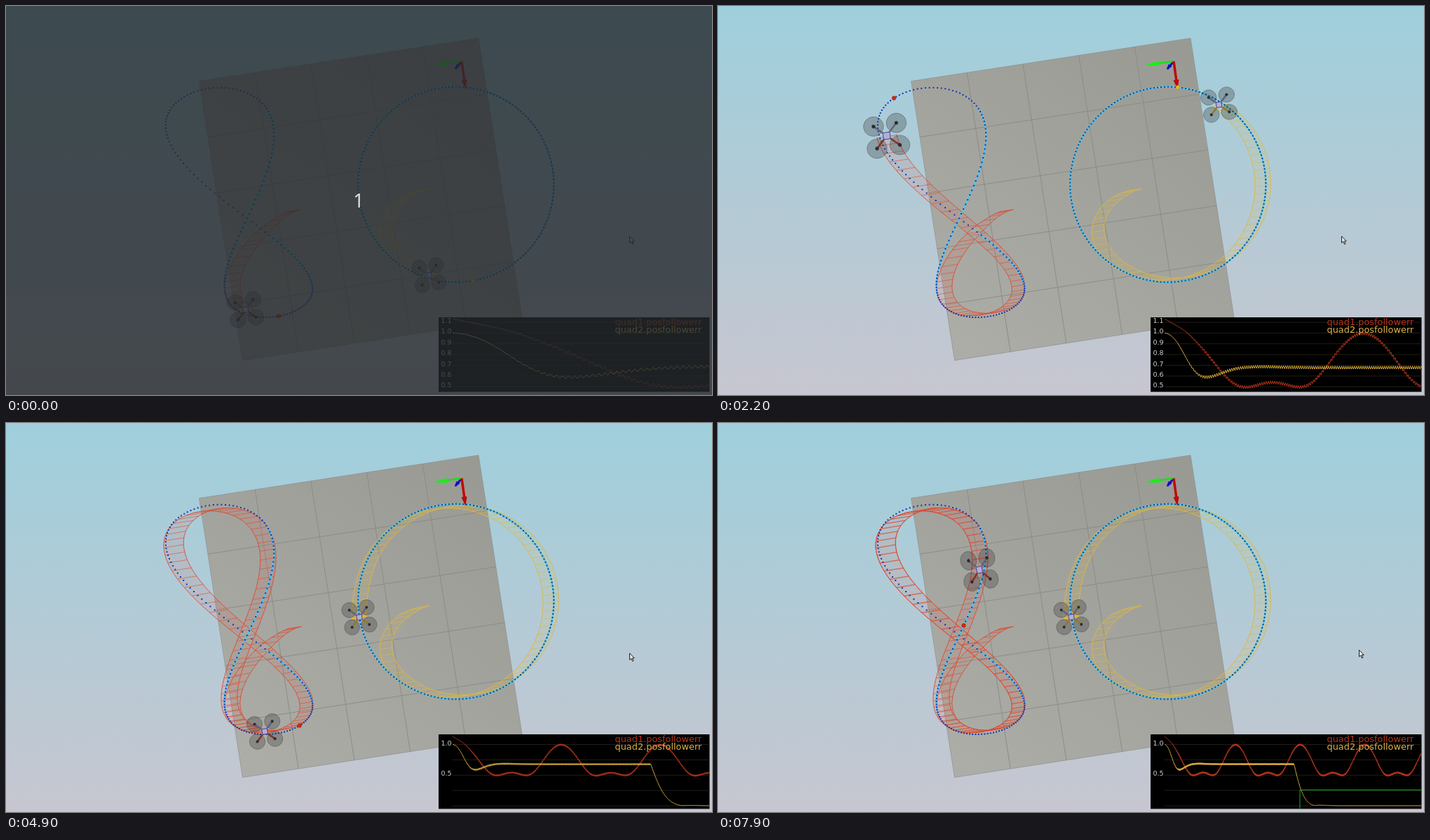
Write an HTML page that moves like this. It is 1007 px wide and 556 px high and loops after 8 s.

```html
<!DOCTYPE html>
<html lang="en">
<head>
<meta charset="utf-8">
<title>Two quadrotors following paths</title>
<style>
html,body{margin:0;width:100%;height:100%;overflow:hidden;background:#b4cbd3}
svg{display:block;width:100vw;height:100vh}
text{font-family:"DejaVu Sans",sans-serif}
.ribbon path{fill:none;stroke:currentColor}
.ribbon .area{fill:currentColor;fill-opacity:.1;stroke:none}
.drone *{vector-effect:non-scaling-stroke}
</style>
</head>
<body>
<svg viewBox="0 0 1007 556" preserveAspectRatio="none">
  <defs>
    <linearGradient id="sky" x2="0" y2="1">
      <stop stop-color="#9fcfdc"/><stop offset="1" stop-color="#c7c6d0"/>
    </linearGradient>
    <linearGradient id="floor" x1=".9" y1="0" x2=".2" y2="1">
      <stop stop-color="#999994"/><stop offset="1" stop-color="#adada7"/>
    </linearGradient>
    <clipPath id="clip"><rect x="617" y="445" width="386.500" height="106.600"/></clipPath>
  </defs>
  <rect width="1007" height="556" fill="url(#sky)"/>
  <path d="M275.500 107.500L674 46L736 445L337.500 506.500Z" fill="url(#floor)" stroke="#8c8f8d" stroke-width=".7"/>
  <path id="tiles" stroke="#8c8c87" fill="none"/>
  <g id="ribbons"></g>
  <g id="paths" fill="none"></g>
  <g fill="none">
    <path d="M650 79L641 90" stroke="#1010b8" stroke-width="3"/>
    <path d="M640 91l2.500-8 5 3.500z" fill="#1010b8"/>
    <path d="M650 79L620 83" stroke="#18e018" stroke-width="2.500"/>
    <path d="M609 84.500l19-6 1 7z" fill="#18f018"/>
    <path d="M650 79L654 108" stroke="#c00808" stroke-width="3.500"/>
    <path d="M655.500 119l-6-13 8-1z" fill="#c00808"/>
  </g>
  <g id="movers"></g>
  <path id="cursor" d="M0 0V9.500L2.300 7.500L4 11.500L5.500 10.800L3.900 7H6.800Z" fill="#e4e4e4" stroke="#222"/>
  <g clip-path="url(#clip)">
    <rect x="617" y="445" width="387" height="107"/>
    <path id="rules" stroke="#241d18"/>
    <path id="plot1" fill="none" stroke="#bb361c"/>
    <path id="plot2" fill="none" stroke="#dcb03c"/>
    <g id="ticks" font-size="9.500" fill="#d4d4d4"></g>
    <text x="868.500" y="455.500" font-size="12.900" fill="#b8341c">quad1.posfollowerr</text>
    <text x="868.500" y="467" font-size="12.900" fill="#dcb848">quad2.posfollowerr</text>
    <path id="frame" d="M1004 524.500H830V551" fill="none" stroke="#22a822"/>
  </g>
  <g id="count">
    <rect width="1007" height="556" fill="#252a2d" fill-opacity=".8"/>
    <text x="503" y="288" font-size="27" text-anchor="middle" fill="#dedede" style="font-family:'Noto Sans',sans-serif">1</text>
  </g>
</svg>
<script>
const $ = id => document.getElementById(id);
const clamp = (v, a = 0, b = 1) => Math.min(b, Math.max(a, v));
const line = pts => 'M' + pts.map(p => p[0].toFixed(1) + ' ' + p[1].toFixed(1)).join('L');
const { sin, cos, hypot, PI } = Math;

function make(tag, parent, attrs) {
  const el = document.createElementNS('http://www.w3.org/2000/svg', tag);
  for (const k in attrs) el.setAttribute(k, attrs[k]);
  return parent.appendChild(el);
}

// World: metres, x to the right, y towards the viewer's bottom, z up; camera looks down
const UNIT = 106, CAM = 7.2, ORIGIN = [504, 277.5], TILT = [.987, .16];
const zoom = z => 1 / (1 - z / CAM);
const axes = (x, y) => [x * TILT[0] + y * TILT[1], y * TILT[0] - x * TILT[1]];
function project([x, y, z]) {
  const s = UNIT * zoom(z), [a, b] = axes(x, y);
  return [ORIGIN[0] + a * s, ORIGIN[1] + b * s];
}

// Reference paths by angle; both start at angle 0
const RATE = 82 * PI / 180;
const eight = a => [-1.53 - .64 * sin(2 * a), 1.56 * sin(a), -sin(a)];
const ring = a => [1.5 - 1.5 * cos(a), 1.5 * sin(a), -1];
const goal1 = T => eight(RATE * T);
const goal2 = T => ring(Math.min(RATE * T, 2 * PI));

// A damped spring with limited thrust pulls each drone after its goal
const STEP = .0065, END = 8.9, STIFF = 5.1, DAMP = .82, THRUST = 9;
function fly(goal, x) {
  let pos = [x, 0, -1], vel = [0, 0, 0];
  const log = [];
  for (let i = 0; i * STEP < END; i++) {
    const T = i * STEP, aim = goal(T);
    let acc = pos.map((p, k) => STIFF * STIFF * (aim[k] - p) - 2 * DAMP * STIFF * vel[k]);
    const cut = Math.min(1, THRUST / hypot(...acc));
    acc = acc.map(a => a * cut);
    const moving = goal(T + STEP)[1] != aim[1];
    const ripple = [0, .014, 0, -.014][i % 4] * clamp((T - .2) / .3) * moving;
    log.push({ pos, acc, err: hypot(...pos.map((p, k) => aim[k] - p)) + ripple });
    vel = vel.map((v, k) => v + acc[k] * STEP);
    pos = pos.map((p, k) => p + vel[k] * STEP);
  }
  return log;
}
const log1 = fly(goal1, -1), log2 = fly(goal2, 1);

// Screen frame of a banked drone: right axis, down axis, centre
function pose({ pos, acc }) {
  const s = 14.2 * zoom(pos[2]);
  const [w, h] = [0, 1].map(k => {
    const bank = Math.atan(acc[k] / 9.8);
    return s * (cos(bank) - sin(bank) * pos[k] / (CAM - pos[2]));
  });
  return [...axes(w, 0), ...axes(0, h), ...project(pos)];
}

// Static parts
let tiles = '';
for (let i = 1; i < 5; i++) {
  const u = i / 5;
  tiles += `M${275.5 + 398.5 * u} ${107.5 - 61.5 * u}l62 399M${275.5 + 62 * u} ${107.5 + 399 * u}l398.5 -61.5`;
}
$('tiles').setAttribute('d', tiles);

function sample(path, from, to, step) {
  const out = [];
  for (let a = from; a < to; a += step) out.push(project(path(a)));
  return out;
}
const addPath = attrs => make('path', $('paths'), attrs);
const glow = (path, from, to) => addPath({
  d: line(sample(path, from * PI, to * PI, .03)), stroke: '#48c8ee', 'stroke-width': 2.2, 'stroke-opacity': .85
});
const dots = (path, stroke) => addPath({
  d: sample(path, 0, 2 * PI, PI / 87).map(p => line([[p[0] - 1, p[1]], [p[0] + 1, p[1]]])).join(''), stroke, 'stroke-width': 2
});
glow(ring, 0, 2.02);
glow(eight, 1.7, 2.25);
glow(eight, .73, .95);
dots(eight, '#1236b4');
dots(ring, '#12468c');

function makeRibbon(color) {
  const g = make('g', $('ribbons'), { class: 'ribbon', color });
  return {
    area: make('path', g, { class: 'area' }),
    rungs: make('path', g, { 'stroke-width': .8, 'stroke-opacity': .75 }),
    edges: make('path', g, { 'stroke-width': 1, 'stroke-opacity': .9 })
  };
}
function makeDrone(arm) {
  const g = make('g', $('movers'), { class: 'drone' });
  const corners = [[-1, -1], [1, -1], [-1, 1], [1, 1]];
  for (const [x, y] of corners)
    make('path', g, { d: `M0 0L${x} ${y}`, stroke: y < 0 ? '#7c789c' : arm, 'stroke-width': 2.6 });
  for (const [cx, cy] of corners) {
    make('circle', g, { cx, cy, r: .87, fill: '#303030', 'fill-opacity': .29, stroke: '#333', 'stroke-opacity': .45, 'stroke-width': .8 });
    make('circle', g, { cx, cy, r: .16, fill: '#2c2c30' });
  }
  make('rect', g, { x: -.3, y: -.3, width: .6, height: .6, fill: '#b4aed6', stroke: '#46468c', 'stroke-width': 1 });
  return g;
}
const makeAim = (fill, stroke) => make('circle', $('movers'), { r: 2.8, fill, stroke, 'stroke-width': .6 });

const actors = [
  { log: log1, goal: goal1, ribbon: makeRibbon('#dc4a30'), aim: makeAim('#d42814', '#8c2a18'), drone: makeDrone('#a8341a') },
  { log: log2, goal: goal2, ribbon: makeRibbon('#dcb840'), aim: makeAim('#e4b828', '#b89030'), drone: makeDrone('#c09428') }
];

function drawRibbon(r, log) {
  const left = [], right = [];
  let rungs = '';
  log.forEach((state, i) => {
    if (i % 3 && i < log.length - 1) return;
    const [ax, ay, , , x, y] = pose(state), w = .86;
    const p = [x - ax * w, y - ay * w], q = [x + ax * w, y + ay * w];
    left.push(p);
    right.push(q);
    if (i % 9 == 0) rungs += line([p, q]);
  });
  r.rungs.setAttribute('d', rungs);
  r.edges.setAttribute('d', line(left) + line(right));
  r.area.setAttribute('d', line(left.concat(right.reverse())) + 'Z');
}

function drawPlot(T, n) {
  const errs = actors.map(a => a.log.slice(0, n).map(s => s.err));
  const min = Math.min(...errs.flat()), range = 1.12 - min;
  const y = v => 449 + (1.12 - v) * 98 / range;
  errs.forEach((e, k) =>
    $('plot' + (k + 1)).setAttribute('d', line(e.map((v, i) => [637 + 367 * i * STEP / T, y(v)]))));
  const wide = range > .85, gap = wide ? .25 : .1;
  let rules = '', ticks = '';
  for (let i = wide ? 4 : 11; i >= 0 && i * gap > min - .01; i--) {
    const v = i * gap;
    rules += `M637 ${y(v).toFixed(1)}H1004`;
    if (v && (!wide || i % 2 == 0) && y(v) < 545)
      ticks += `<text x="620.5" y="${(y(v) + 1).toFixed(1)}">${v.toFixed(1)}</text>`;
  }
  $('rules').setAttribute('d', rules);
  $('ticks').innerHTML = ticks;
}

const beats = [[0, 1.11], [.9, 1.83], [2.2, 3.11], [3.3, 4.21], [4.9, 5.7], [7, 7.8], [8, 8.83]];
function clock(t) {
  const i = beats.findIndex(b => b[0] > t), [a, p] = beats[i - 1], [b, q] = beats[i];
  return p + (q - p) * (t - a) / (b - a);
}
const moveTo = (el, [x, y]) => el.setAttribute('transform', `translate(${x.toFixed(1)} ${y.toFixed(1)})`);

function draw(ms) {
  const t = ms / 1000, T = clock(t), n = Math.round(T / STEP) + 1;
  for (const a of actors) {
    drawRibbon(a.ribbon, a.log.slice(0, n));
    a.drone.setAttribute('transform', `matrix(${pose(a.log[n - 1]).map(v => v.toFixed(2))})`);
    moveTo(a.aim, project(a.goal(T)));
  }
  drawPlot(T, n);
  const c = clamp((t - 5.8) / .4);
  moveTo($('cursor'), [889.5 + 25 * c, 329 - 4.5 * c]);
  $('count').style.display = ms < 100 ? '' : 'none';
  $('frame').style.display = ms >= 7900 ? '' : 'none';
}

let last = -1;
const start = performance.now();
function tick() {
  const ms = Math.floor((performance.now() - start) % 8000 / 100) * 100;
  if (ms != last) draw(last = ms);
  requestAnimationFrame(tick);
}
tick();
</script>
</body>
</html>
```
